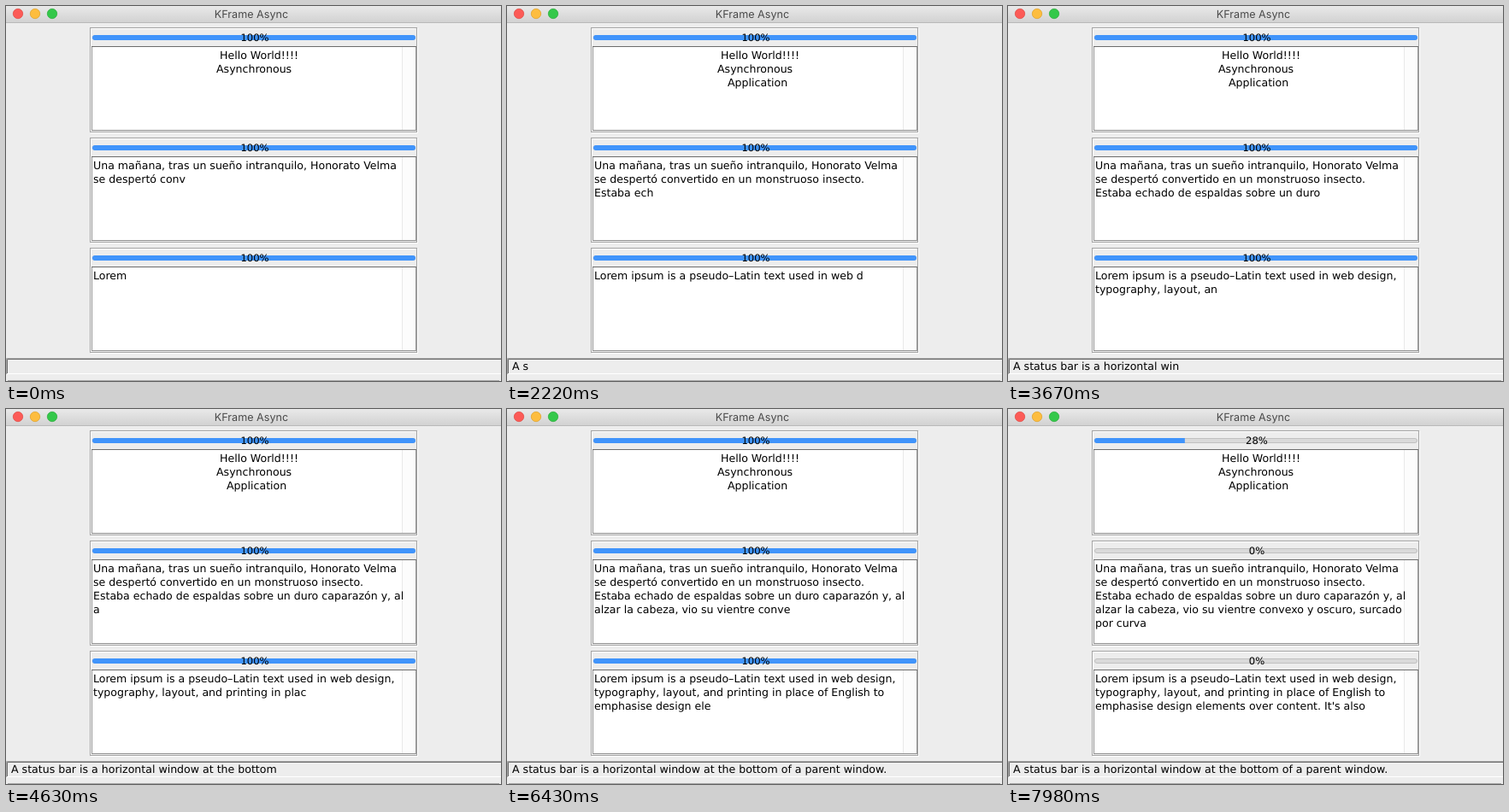
An HTML page that plays this animation: 579 px wide and 439 px high, repeating every 8000 ms.

```html
<!DOCTYPE html>
<html lang="en">
<head>
<meta charset="utf-8">
<title>KFrame Async</title>
<style>
  html, body { margin: 0; width: 100%; height: 100%; overflow: hidden; background: #ededed; }
  svg { display: block; width: 579px; height: 439px; }
  text { font: 12.57px "DejaVu Sans", sans-serif; text-rendering: geometricPrecision; white-space: pre; }
  .title { font: 12.6px Inter, sans-serif; fill: #4a4a4a; text-anchor: middle; }
  .label { font-size: 11.6px; text-anchor: middle; }
  .line { fill: none; }
</style>
</head>
<body>
<svg id="stage" viewBox="0 0 579 439">
  <defs>
    <linearGradient id="bar" x2="0" y2="1">
      <stop stop-color="#e9e9e9"/><stop offset="1" stop-color="#d2d2d2"/>
    </linearGradient>
  </defs>
  <rect width="579" height="439" fill="#ededed"/>
  <rect width="579" height="19" fill="url(#bar)"/>
  <rect y="19" width="579" height="1" fill="#b9b9b9"/>
  <circle cx="14" cy="9" r="5.7" fill="#fc5b57" stroke="#e0443e" stroke-width=".7"/>
  <circle cx="34" cy="9" r="5.7" fill="#fdbd3f" stroke="#dfa023" stroke-width=".7"/>
  <circle cx="54" cy="9" r="5.7" fill="#34c84a" stroke="#24ab35" stroke-width=".7"/>
  <text class="title" x="287" y="14">KFrame Async</text>
  <g id="panels"></g>
  <path class="line" d="M.5 431V412.5H579" stroke="#a8a8a8"/>
  <path class="line" d="M1.5 430V413.5H579" stroke="#6e6e6e"/>
  <path class="line" d="M1 430.5H579" stroke="#fff"/>
  <text id="status" x="6" y="426"></text>
  <path class="line" d="M2 438.5H577" stroke="#a6a6a6"/>
</svg>
<script>
const LOOP = 8000, CHAR_MS = 51, LINE_HEIGHT = 16;
const RESET = [6600, 6660, 6660], REFILL = 7110, PERCENT_MS = 31;

const greeting = [["Hello World!!!!", 250], ["Asynchronous", 246], ["Application", 258]];
const statusText = "A status bar is a horizontal window at the bottom of a parent window.";

// hold: letters of a line's first word that still fit on the line above
const stories = [
  {
    typed: 69,
    lines: [
      "Una mañana, tras un sueño intranquilo, Honorato Velma",
      "se despertó convertido en un monstruoso insecto.",
      "Estaba echado de espaldas sobre un duro caparazón y, al",
      "alzar la cabeza, vio su vientre convexo y oscuro, surcado",
      "por curvadas"
    ],
    hold: { 2: 5 }
  },
  {
    typed: 5,
    lines: [
      "Lorem ipsum is a pseudo–Latin text used in web design,",
      "typography, layout, and printing in place of English to",
      "emphasise design elements over content. It's also called"
    ],
    hold: { 2: 1 }
  }
];
stories[0].typed = stories[0].lines[0].length + 1 + "se despertó conv".length;

function add(tag, attrs, parent) {
  const node = document.createElementNS("http://www.w3.org/2000/svg", tag);
  for (const key in attrs) node.setAttribute(key, attrs[key]);
  return parent.appendChild(node);
}

function box(parent, x, y, width, height, attrs) {
  return add("rect", { x, y, width, height, ...attrs }, parent);
}

function setText(node, value) {
  if (node.textContent !== value) node.textContent = value;
}

function makePanel(index) {
  const g = add("g", { transform: `translate(0 ${index * 129})` }, document.getElementById("panels"));
  box(g, 99.5, 26.5, 382, 122, { fill: "none", stroke: "#fff" });
  box(g, 98.5, 25.5, 382, 122, { fill: "none", stroke: "#a3a3a3" });
  box(g, 101.5, 34.5, 377, 5, { rx: 2.5, fill: "#dadada", stroke: "#c0c0c0" });
  const fill = box(g, 101, 34, 378, 6, { rx: 3, fill: "#4094fb" });
  const label = add("text", { class: "label", x: 291, y: 41 }, g);
  box(g, 100.5, 47.5, 379, 98, { fill: "#fff", stroke: "#929292" });
  add("path", { class: "line", d: "M100 47.5H480", stroke: "#6c6c6c" }, g);
  box(g, 463, 48, 16, 97, { fill: "#fcfcfc" });
  box(g, 463, 48, 1, 97, { fill: "#e9e9e9" });
  const rows = Array.from({ length: 5 }, (_, i) =>
    add("text", { x: index ? 102 : greeting[i]?.[1] ?? 102, y: 62 + i * LINE_HEIGHT }, g));
  return { fill, label, rows };
}

const panels = [0, 1, 2].map(makePanel);
const statusNode = document.getElementById("status");

function typeStory({ typed, lines, hold }, count) {
  let left = typed + count;
  const shown = [];
  lines.forEach((line, i) => {
    const part = line.slice(0, Math.max(0, left));
    if (part && part.length <= (hold[i] ?? 0)) shown[i - 1] += " " + part;
    else shown[i] = part;
    left -= line.length + 1;
  });
  return shown;
}

function percentAt(index, t) {
  if (t < RESET[index]) return 100;
  return index ? 0 : Math.max(0, Math.floor((t - REFILL) / PERCENT_MS));
}

function draw(t) {
  const count = Math.floor(t / CHAR_MS + 0.03);
  panels.forEach(({ fill, label, rows }, i) => {
    const percent = percentAt(i, t);
    fill.style.clipPath = `inset(0 ${100 - percent}% 0 0)`;
    setText(label, percent + "%");
    const shown = i
      ? typeStory(stories[i - 1], count)
      : greeting.map(([line], k) => k < 2 ? line : line.slice(0, Math.max(0, count - 8)));
    rows.forEach((row, k) => setText(row, shown[k] ?? ""));
  });
  setText(statusNode, statusText.slice(0, Math.max(0, count - 40)));
}

function tick() {
  draw(performance.now() % LOOP);
  requestAnimationFrame(tick);
}
tick();
</script>
</body>
</html>
```
